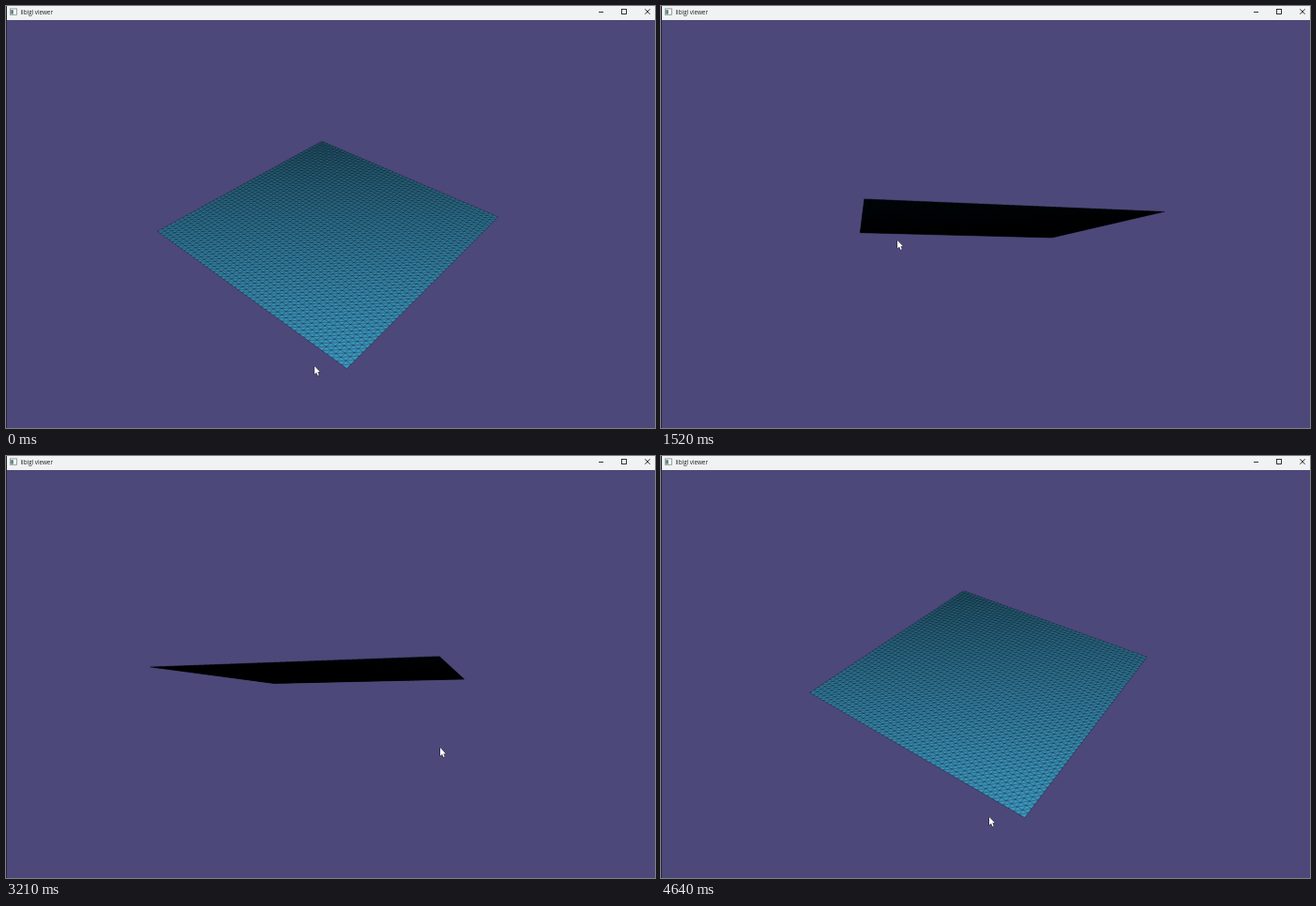
Write an HTML page with a canvas that moves like this. It is 692x450 px and loops after 4.67 s.

```html
<!DOCTYPE html>
<html lang="en">
<head>
<meta charset="utf-8">
<title>libigl viewer</title>
<style>
  html, body { margin: 0; width: 100%; height: 100%; overflow: hidden; background: #4c4879; }
  canvas { position: absolute; left: 0; top: 0; }
  .bar { position: absolute; left: 0; top: 0; width: 692px; height: 15px; background: #f0f2f3; }
  .bar span { position: absolute; left: 15.5px; top: 0; font: 6.3px/13px "Open Sans", "Noto Sans", sans-serif; color: #1c1c1c; white-space: pre; }
  .bar svg { position: absolute; left: 0; top: 0; }
  .edge { position: absolute; left: 0; top: 0; width: 1px; height: 450px; background: #27253d; }
</style>
</head>
<body>
<canvas id="view" width="692" height="450"></canvas>
<div class="bar">
  <svg width="692" height="15" fill="none" stroke="#222" stroke-width=".9">
    <rect x="4.4" y="2.9" width="7" height="6.4" fill="#fafafa" stroke="#85898c" stroke-width=".8"/>
    <rect x="5.2" y="4.2" width="2.6" height="4.4" fill="#4d8278" stroke="none"/>
    <path d="M632 6.5h5M681.3 3.3l5.4 5.4M686.7 3.3l-5.4 5.4"/>
    <rect x="656.5" y="3.5" width="5" height="5"/>
  </svg>
  <span>libigl viewer</span>
</div>
<div class="edge"></div>
<script>
const ctx = document.getElementById('view').getContext('2d');
const LOOP = 4670;
const CX = 346.5, CY = 232.5, FOCAL = 525, DIST = 5, RADIUS = Math.sqrt(3);
const CELLS = 50, LIGHT_Y = 0.3, AMBIENT = 0.07, BASE = [66, 163, 208];

// Key poses of the drag: time, yaw and pitch in degrees, pointer x and y
const poses = [
  [0, 86.1, 38.2, 329, 384],
  [480, 96.5, 39, 281, 378],
  [850, 105.9, 38.5, 245, 345],
  [1520, 120.1, -6.8, 252, 250],
  [2240, 86.3, -25.5, 390, 227],
  [3210, 64, -4.6, 463, 311],
  [3970, 65, 29.8, 432, 364],
  [4640, 80.4, 38.8, 350, 385]
];
const last = poses.length - 1;

const secant = (i, k) => (poses[i + 1][k] - poses[i][k]) / (poses[i + 1][0] - poses[i][0]);

// Slope of the parabola through a pose and its neighbours
function slope(i, k) {
  if (i === 0) return 2 * secant(0, k) - slope(1, k);
  if (i === last) return 2 * secant(last - 1, k) - slope(last - 1, k);
  const before = poses[i][0] - poses[i - 1][0], after = poses[i + 1][0] - poses[i][0];
  return (secant(i - 1, k) * after + secant(i, k) * before) / (before + after);
}

function poseAt(t) {
  let i = 0;
  while (i < last - 1 && t >= poses[i + 1][0]) i++;
  const h = poses[i + 1][0] - poses[i][0];
  const s = Math.min((t - poses[i][0]) / h, 1), r = 1 - s;
  return [1, 2, 3, 4].map(k => r * r * (1 + 2 * s) * poses[i][k] + s * s * (1 + 2 * r) * poses[i + 1][k]
    + h * s * r * (r * slope(i, k) - s * slope(i + 1, k)));
}

function drawPlane(yaw, pitch) {
  const sp = Math.sin(pitch), cp = Math.cos(pitch);
  const ax = RADIUS * Math.cos(yaw), az = RADIUS * Math.sin(yaw);
  const screenY = z => CY + FOCAL * z * sp / (DIST - z * cp);
  // a and b run along the two diagonals of the square
  const project = (a, b) => {
    const x = a * ax - b * az, z = a * az + b * ax;
    return [CX + FOCAL * x / (DIST - z * cp), screenY(z)];
  };

  // With no roll, depth and so the shade depend on screen y only
  const facing = Math.max(0, LIGHT_Y * cp + DIST * sp);
  const reach = Math.max(Math.abs(ax), Math.abs(az));
  const top = screenY(-reach), bottom = screenY(reach);
  const fill = ctx.createLinearGradient(0, top, 0, bottom);
  for (let i = 0; i <= 8; i++) {
    const z = reach * (i / 4 - 1);
    const k = AMBIENT + facing / Math.hypot(LIGHT_Y + z * sp, DIST - z * cp);
    const at = Math.min(1, Math.max(0, (screenY(z) - top) / (bottom - top || 1)));
    fill.addColorStop(at, `rgb(${BASE.map(c => Math.round(c * k))})`);
  }

  ctx.beginPath();
  for (const [a, b] of [[1, 0], [0, 1], [-1, 0], [0, -1]]) ctx.lineTo(...project(a, b));
  ctx.closePath();
  ctx.fillStyle = fill;
  ctx.fill();

  const line = (a0, b0, a1, b1) => {
    ctx.moveTo(...project(a0, b0));
    ctx.lineTo(...project(a1, b1));
  };
  ctx.beginPath();
  for (let i = 0; i <= CELLS; i++) {
    const q = i / CELLS;
    line(q, q - 1, q - 1, q);
    line(q, 1 - q, q - 1, -q);
  }
  for (let i = 1 - CELLS; i < CELLS; i++) {
    const a = i / CELLS, w = 1 - Math.abs(a);
    line(a, -w, a, w);
  }
  ctx.strokeStyle = 'rgba(0, 0, 0, .55)';
  ctx.lineWidth = 0.5;
  ctx.stroke();
}

const arrow = new Path2D('M0 0V8.6L2 6.8L3.4 10L4.8 9.4L3.4 6.3H6Z');

function drawCursor(x, y) {
  ctx.save();
  ctx.translate(x, y);
  ctx.lineWidth = 0.9;
  ctx.strokeStyle = '#15141f';
  ctx.stroke(arrow);
  ctx.fillStyle = '#fff';
  ctx.fill(arrow);
  ctx.restore();
}

function render(now) {
  const [yaw, pitch, x, y] = poseAt(now % LOOP);
  const rad = Math.PI / 180;
  ctx.fillStyle = '#4c4879';
  ctx.fillRect(0, 0, 692, 450);
  drawPlane(yaw * rad, pitch * rad);
  drawCursor(x, y);
}

const start = performance.now();
function loop() {
  render(performance.now() - start);
  requestAnimationFrame(loop);
}
loop();
</script>
</body>
</html>
```
